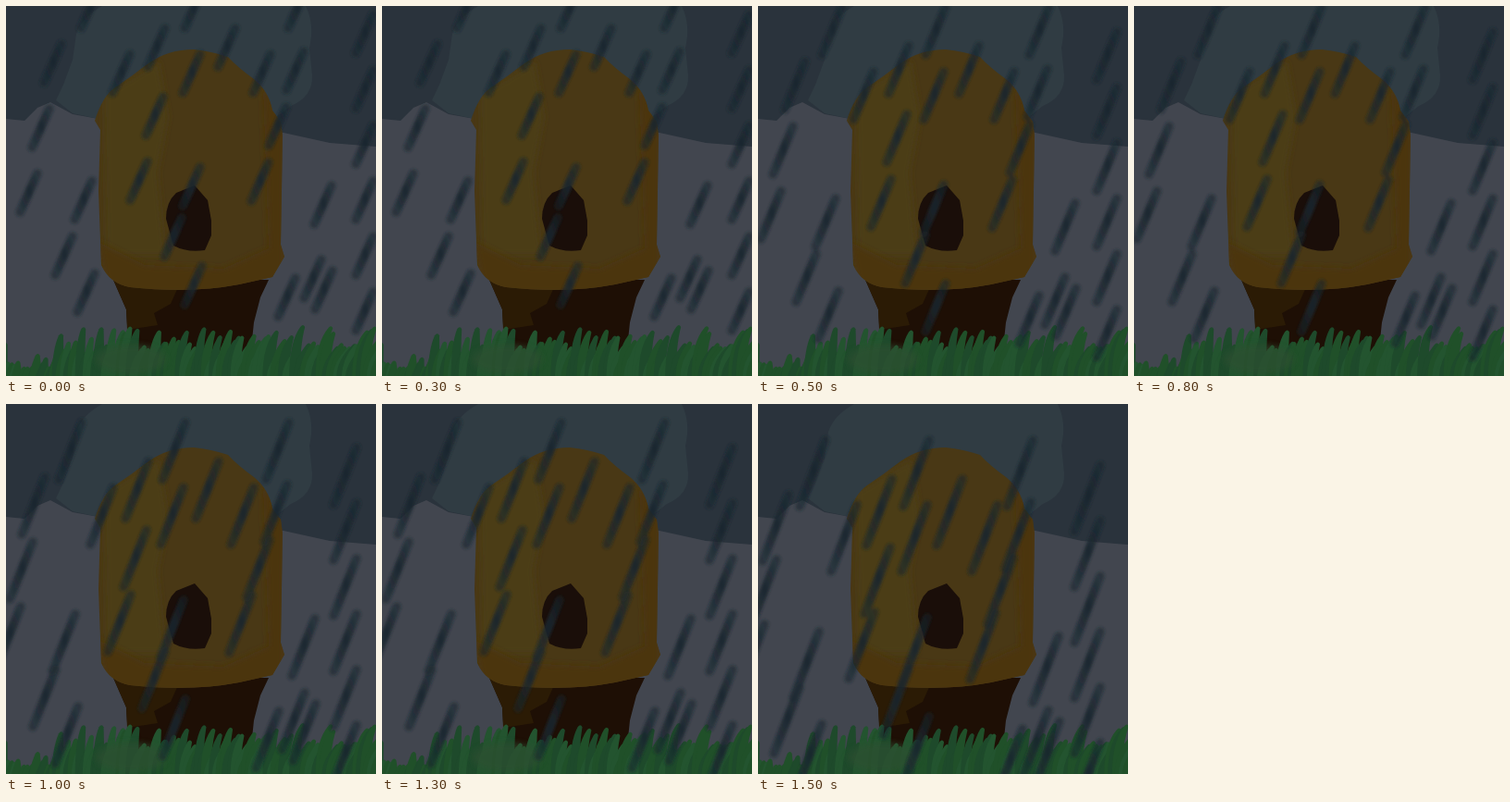
Animation of 400x400 px, one loop 2000 ms. Source, as an HTML page:

```html
<!DOCTYPE html>
<html lang="en">
<head>
<meta charset="utf-8">
<title>Hive in the rain</title>
<style>
html, body { margin: 0; width: 100%; height: 100%; overflow: hidden; background: #42464f; }
svg { display: block; width: 100vw; height: 100vh; }
.rain { visibility: hidden; animation: show 2s step-end infinite; }
@keyframes show {
  0% { visibility: visible; }
  25%, 100% { visibility: hidden; }
}
</style>
</head>
<body>
<svg viewBox="0 0 400 400" id="stage">
  <defs>
    <filter id="soft" filterUnits="userSpaceOnUse" x="-30" y="-60" width="460" height="520">
      <feGaussianBlur stdDeviation="1.5"/>
    </filter>
    <filter id="smear" filterUnits="userSpaceOnUse" x="0" y="0" width="400" height="400">
      <feGaussianBlur stdDeviation="3"/>
    </filter>
    <linearGradient id="wet" x1="1" y1="0" x2="0" y2="1">
      <stop offset="0" stop-color="#17252e" stop-opacity=".5"/>
      <stop offset=".45" stop-color="#17252e" stop-opacity=".9"/>
      <stop offset="1" stop-color="#17252e" stop-opacity=".5"/>
    </linearGradient>
    <path id="hive" d="M203 47Q175 47 154 62Q136 76 118 88Q104 98 96 124L102 134L100 200L103 280Q112 300 134 304Q200 311 252 301L288 293L301 271L297 258L299 140L297 125L288 113Q284 92 268 79Q250 66 240 55Q222 49 203 47Z"/>
    <clipPath id="body"><use href="#hive"/></clipPath>
  </defs>

  <path fill="#2a333c" d="M0 0H400V152L350 148L300 137L200 130L100 122L72 117L48 104L34 110L20 124L0 122Z"/>
  <path fill="#303c43" d="M104 0Q82 12 76 30L72 58L62 85L54 102L72 116L100 122H290L308 108Q332 98 331 75L328 45Q334 20 324 0Z"/>

  <path fill="#1e0f05" d="M116 296H284L275 315L268 342L262 400H140L131 345L130 328Z"/>
  <path fill="#2b1b05" d="M116 296L186 304L178 322L160 332L164 345L131 350L130 328Z"/>

  <use href="#hive" fill="#493815"/>
  <g clip-path="url(#body)">
    <path fill="#4b3c17" filter="url(#smear)" d="M106 95L165 60L175 120L164 180L172 270H108Z"/>
    <path fill="#4b340f" filter="url(#smear)" d="M278 85L300 120V310H110L100 255L150 280L235 284L284 262Z"/>
  </g>
  <path fill="#1a0e09" d="M204 194L184 202Q173 212 173 230L181 259Q196 267 215 264L222 248V232L218 210Z"/>

  <g id="grass"></g>
</svg>
<script>
const NS = 'http://www.w3.org/2000/svg';
const stage = document.getElementById('stage');
const grass = document.getElementById('grass');

function add(parent, tag, attrs) {
  const el = document.createElementNS(NS, tag);
  for (const key in attrs) el.setAttribute(key, attrs[key]);
  return parent.appendChild(el);
}

let seed = 7;
const rand = () => (seed = seed * 16807 % 2147483647) / 2147483647;

// Grass: dense blades that lean more to the right across the meadow
const greens = ['#1e4a2b', '#205029', '#23542f'];
for (let x = -4; x < 404; x += 4) {
  const tip = (x < 55 ? 364 : 345) + rand() * 28;
  const lean = 1 + x / 40 + rand() * 3;
  const w = 5 + rand() * 2;
  add(grass, 'path', {
    fill: greens[Math.floor(rand() * greens.length)],
    d: `M${x - w} 402Q${x - w} ${tip + 18} ${x + lean - 3} ${tip + 2}q3 -4 5 0Q${x + w} ${tip + 22} ${x + w} 402Z`
  });
}
add(grass, 'ellipse', { cx: 135, cy: 382, rx: 38, ry: 16, fill: '#2f5030', opacity: .6, filter: 'url(#smear)' });

// Rain: runs of evenly spaced streaks, each first top point, count and spacing
const runs = [
  [62, 37, 3, -13, 70], [102, -22, 3, 112, 0], [136, 48, 3, 76, 0], [174, 20, 2, 76, 0],
  [324, 45, 3, -19, 60], [172, 94, 2, -17, 70], [212, 170, 2, -20, 55], [95, 185, 2, -21, 60],
  [98, 285, 2, 116, -8], [354, 190, 2, -11, 80], [399, 5, 6, 0, 60], [315, 290, 2, 40, -8]
];

function streak(parent, x, y, step) {
  // The lower end falls faster than the top, so streaks grow
  add(parent, 'line', {
    x1: x - 9 * step - 2, y1: y + 19 * step + 4,
    x2: x - 21 - 12 * step, y2: y + 46 + 29 * step,
    stroke: 'url(#wet)'
  });
}

for (let step = 0; step < 4; step++) {
  const group = add(stage, 'g', {
    class: 'rain', filter: 'url(#soft)', 'stroke-linecap': 'round', 'stroke-width': 9.5,
    style: `animation-delay:${step * .5 - 2}s`
  });
  for (const [x, y, count, dx, dy] of runs) {
    for (let i = 0; i < count; i++) streak(group, x + i * dx, y + i * dy, step);
  }
}
</script>
</body>
</html>
```
